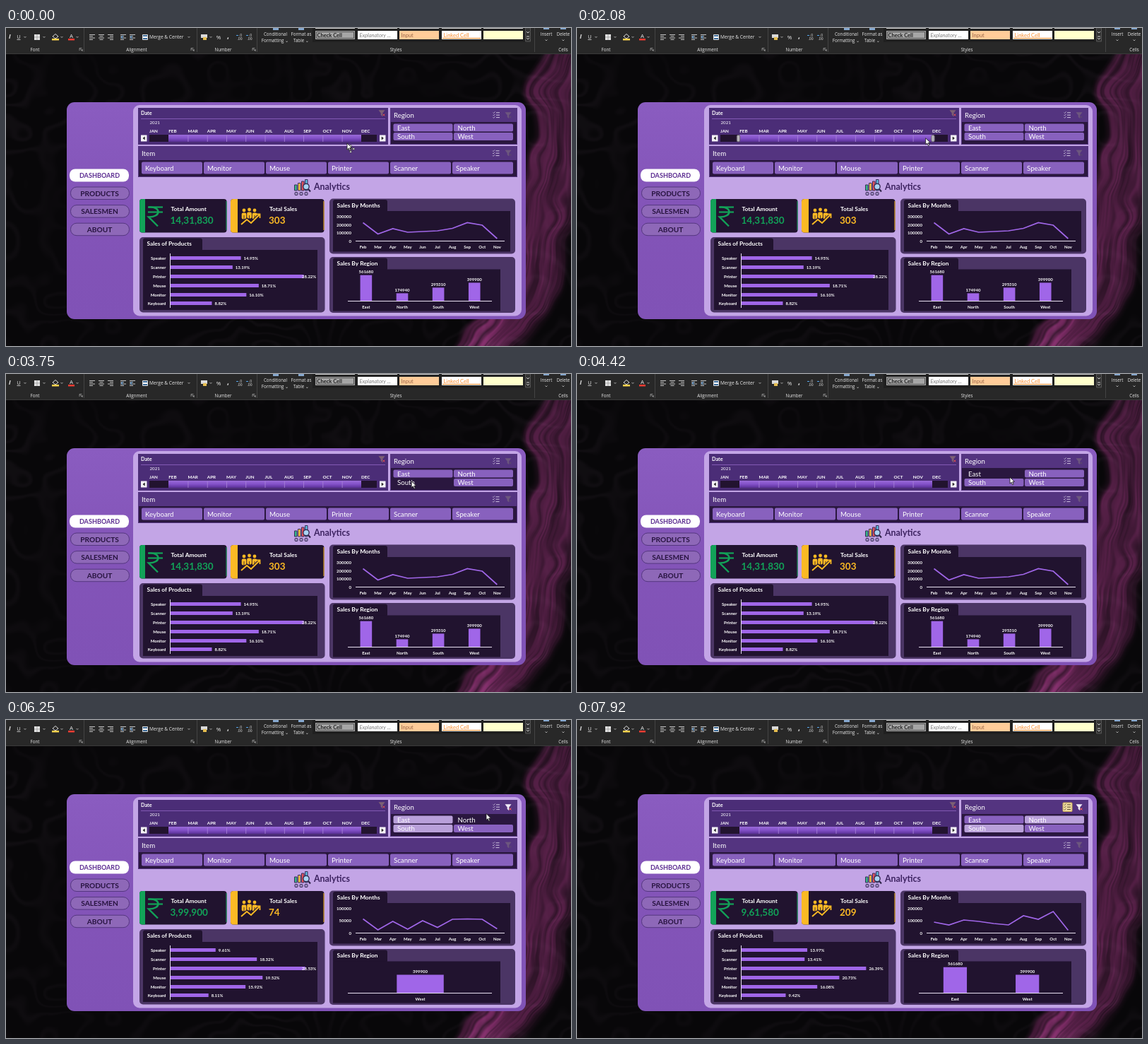
Animation, 800 px wide and 450 px high, one loop 8 s. Source, as an HTML page with a canvas:

```html
<!DOCTYPE html>
<html lang="en">
<head>
<meta charset="utf-8">
<title>Sales dashboard</title>
<style>
html, body { margin: 0; height: 100%; overflow: hidden; background: #08070a; }
canvas { display: block; width: 800px; height: 450px; }
</style>
</head>
<body>
<canvas id="stage" width="800" height="450"></canvas>
<script>
const LOOP = 8000;
const ctx = document.getElementById('stage').getContext('2d');
const LATO = 'Lato, sans-serif', UI = '"Open Sans", sans-serif';
const DARK = '#21132f', BAR = '#a066e8', PANEL = '#4b3565', GREEN = '#12a258', GOLD = '#fbb924';

const DATA = {
  all: { total: '14,31,830', count: 303, share: [14.95, 13.19, 28.22, 18.71, 16.10, 8.82], ticks: [300000, 200000, 100000, 0],
    line: [26, 10, 17.5, 12.5, 13.5, 14.5, 18, 26, 22.5, 3.5], regions: ['East', 'North', 'South', 'West'] },
  east: { total: '5,61,680', count: 135, share: [16.52, 10.54, 25.13, 21.44, 16.17, 10.19], ticks: [150000, 100000, 50000, 0],
    line: [7.5, 12.5, 13, 18, 6.5, 9.5, 19.5, 11.5, 28, 2], regions: ['East'] },
  west: { total: '3,99,900', count: 74, share: [9.61, 18.32, 28.53, 19.52, 15.92, 8.11], ticks: [100000, 50000, 0],
    line: [20, 4.5, 16.5, 5.5, 17.5, 8, 19.5, 20, 19.5, 6], regions: ['West'] },
  both: { total: '9,61,580', count: 209, share: [13.97, 13.41, 26.39, 20.73, 16.08, 9.42], ticks: [200000, 100000, 0],
    line: [15.5, 11.5, 18.5, 16.5, 13.5, 11.5, 24.5, 19.5, 30.5, 4], regions: ['East', 'West'] }
};
const SALES = { East: 561680, North: 174940, South: 295310, West: 399900 };
const MONTHS = 'Jan Feb Mar Apr May Jun Jul Aug Sep Oct Nov Dec'.split(' ');

// time, x, y of the pointer tip
const PATH = [[0, 483, 163], [300, 483, 163], [700, 489, 155], [1900, 489, 155], [2600, 517, 160],
  [3300, 517, 160], [4100, 613, 146], [4550, 613, 146], [4950, 657, 152.5], [5400, 657, 152.5],
  [6100, 680, 132.5], [6300, 680, 132.5], [6600, 692, 122], [6850, 692, 122], [7200, 600, 139], [8000, 600, 139]];

function rect(x, y, w, h, fill, r = 0, stroke) {
  ctx.beginPath();
  ctx.roundRect(x, y, w, h, r);
  if (fill) { ctx.fillStyle = fill; ctx.fill(); }
  if (stroke) { ctx.strokeStyle = stroke; ctx.lineWidth = 1; ctx.stroke(); }
}

// y is the middle of the capitals
function text(str, x, y, size, color = '#fff', { weight = 400, align = 'left', family = LATO } = {}) {
  ctx.font = `${weight} ${size}px ${family}`;
  ctx.textAlign = align;
  ctx.fillStyle = color;
  ctx.fillText(str, x, y + size * 0.36);
}

const label = (str, x, y, align = 'center') => text(str, x, y, 6, '#fff', { weight: 700, align });

function line(points, color, width = 1, close = false, fill) {
  ctx.beginPath();
  points.forEach(([x, y]) => ctx.lineTo(x, y));
  if (close) ctx.closePath();
  if (fill) { ctx.fillStyle = fill; ctx.fill(); }
  ctx.strokeStyle = color;
  ctx.lineWidth = width;
  ctx.stroke();
}

function circle(x, y, r, fill) {
  ctx.beginPath();
  ctx.arc(x, y, r, 0, 7);
  ctx.fillStyle = fill;
  ctx.fill();
}

function gradient(y0, y1, ...colors) {
  const g = ctx.createLinearGradient(0, y0, 0, y1);
  colors.forEach((c, i) => g.addColorStop(i / (colors.length - 1), c));
  return g;
}

const clamp = v => Math.max(0, Math.min(1, v));
const smooth = v => { v = clamp(v); return v * v * (3 - 2 * v); };

// Marbled wallpaper: a magenta stream down the right side, bending left at the bottom, over faint grey swirls
function makeWallpaper() {
  const hash = (x, y) => { const s = Math.sin(x * 127.1 + y * 311.7) * 43758.5453; return s - Math.floor(s); };
  const noise = (x, y) => {
    const i = Math.floor(x), j = Math.floor(y), u = smooth(x - i), v = smooth(y - j);
    const top = hash(i, j) * (1 - u) + hash(i + 1, j) * u;
    const low = hash(i, j + 1) * (1 - u) + hash(i + 1, j + 1) * u;
    return top * (1 - v) + low * v;
  };
  const canvas = new OffscreenCanvas(800, 450), c = canvas.getContext('2d');
  const image = c.createImageData(800, 450);
  for (let y = 0, p = 0; y < 450; y++) {
    const depth = y / 450;
    const middle = 776 - 95 * depth ** 4 + 45 * clamp(1 - y / 150) ** 2;
    for (let x = 0; x < 800; x++, p += 4) {
      const warp = noise(x / 75, y / 75) * 0.65 + noise(x / 30, y / 30) * 0.35;
      const across = x - middle + 50 * (warp - 0.5);
      const stream = smooth((across + 50) / 16) * (1 - smooth((across - 18) / 38));
      const streak = noise(across / 7, y / 90) * 0.6 + noise(across / 2.5, y / 45) * 0.4;
      const k = stream * (0.25 + 0.85 * streak) * (0.8 + 0.5 * depth ** 3);
      const swirl = Math.max(0, Math.sin(warp * 32)) ** 2 * 9 * noise(x / 120 + 9, y / 120);
      image.data.set([8 + swirl + k * 98, 7 + swirl * 0.8 + k * 31, 9 + swirl + k * 78, 255], p);
    }
  }
  c.putImageData(image, 0, 0);
  return canvas;
}

function ribbon() {
  const ui = (s, x, y, align = 'center', size = 6.2, weight = 400) => text(s, x, y, size, '#e8e8e8', { family: UI, align, weight });
  rect(0, 0, 800, 37, '#282828');
  rect(0, 36, 800, 1, '#3a3a3a');
  [110, 270, 355, 748].forEach(x => rect(x, 0, 1, 34, '#444'));
  [['Font', 41], ['Alignment', 185], ['Number', 307.5], ['Styles', 552], ['Cells', 789]].forEach(([s, x]) => ui(s, x, 31));
  [106, 264, 351].forEach(x => {
    line([[x - 2, 32], [x - 2, 28.5], [x + 1.5, 28.5]], '#aaa', 0.7);
    line([[x - 1, 29.5], [x + 2, 32.5], [x + 2, 30]], '#ccc', 0.8);
  });
  text('I', 4, 12.5, 8, '#eee', { weight: 'italic 700', family: UI });
  ui('U', 18, 12, 'center', 7.5);
  rect(15.5, 16, 5, 0.8, '#ddd');
  rect(40, 9, 8, 8, '#e2e2e2');
  line([[44, 9], [44, 17]], '#888', 0.6);
  line([[40, 13], [48, 13]], '#888', 0.6);
  line([[66, 12], [70, 8.5], [74, 12], [70, 15]], '#ddd', 1, true);
  rect(65, 15, 10, 2.5, '#ffd34d');
  ui('A', 92.5, 11, 'center', 8);
  rect(88, 15, 9, 2.5, '#f03c32');
  [27, 54, 79, 101, 259, 290].forEach(x => line([[x - 1.5, 12], [x, 13.5], [x + 1.5, 12]], '#ccc', 0.8));
  [118, 131, 144, 162, 175].forEach((x, n) => {
    for (let i = 0; i < 4; i++) rect(x + (n === 1 && i % 2 ? 1.5 : n === 2 && i % 2 ? 3 : 0), 9 + i * 2.3, i % 2 ? 5 : 8, 0.9, '#d5d5d5');
    if (n > 2) line([[x + 4, 11], [x + 1, 13], [x + 4, 15]], '#57a5ee', 0.9);
  });
  rect(193.5, 9.5, 7, 7, '#3f6d9a', 0, '#ddd');
  rect(194, 12, 6, 2, '#fff');
  ui('Merge & Center', 203, 13, 'left', 6.6);
  rect(276, 9, 9, 5, '#d9d9d9');
  rect(279, 13, 5, 4, '#e5bd50');
  ui('%', 301, 13, 'center', 8);
  ui(',', 314.5, 11, 'center', 10, 700);
  [331, 345].forEach(x => {
    ui('.0', x + 1, 10.5, 'center', 5);
    ui('.00', x, 15, 'center', 5);
    rect(x - 5, 10, 3, 1, '#57a5ee');
  });
  ui('Conditional', 381.5, 9);
  ui('Formatting ⌄', 381, 17.5);
  ui('Format as', 418, 9);
  ui('Table ⌄', 418, 17.5);
  rect(378, 0, 8, 3, '#86a8cf');
  rect(414, 0, 8, 3, '#86a8cf');
  rect(434, 0, 302, 20, '#202020');
  const styles = [['Check Cell', '#a5a5a5', '#222', 700], ['Explanatory ...', '#fff', '#7f7f7f', 'italic 400'],
    ['Input', '#ffcc99', '#9a6a4a', 400], ['Linked Cell', '#fff', '#fa8a28', 400], ['', '#ffffcc', '#000', 400]];
  styles.forEach(([name, fill, color, weight], i) => {
    const x = Math.round(438 + i * 59.6);
    rect(x, 0, 56, 1, '#d0d0d0');
    rect(x, 4, 56, 12, fill);
    if (!i) rect(x + 1.5, 5.5, 53, 9, null, 0, '#555');
    if (i === 3) rect(x + 1, 14, 54, 1, '#fa8a28');
    text(name, x + 2.5, 10, 7.5, color, { weight });
  });
  rect(735.5, 0, 7, 19, '#333', 0, '#555');
  line([[737, 5], [739, 7], [741, 5]], '#ddd', 0.9);
  line([[737, 12], [741, 12]], '#ddd', 0.9);
  line([[737, 14], [739, 16], [741, 14]], '#ddd', 0.9);
  [['Insert', 765], ['Delete', 789]].forEach(([s, x]) => {
    ui(s, x, 9);
    line([[x - 1.5, 16.5], [x, 18], [x + 1.5, 16.5]], '#ccc', 0.8);
    rect(x - 4, 0, 8, 2, '#86a8cf');
  });
}

function sidebar() {
  rect(86, 105, 650, 307, gradient(105, 412, '#8a5cc0', '#8354b8', '#8052b6'), 11);
  rect(180, 109, 550, 298.5, '#c3a5e6', 9);
  rect(90, 199.5, 84, 18, '#fff', 8);
  text('DASHBOARD', 132.5, 208.5, 9.1, '#5c2d91', { weight: 700, align: 'center' });
  ['PRODUCTS', 'SALESMEN', 'ABOUT'].forEach((s, i) => {
    const y = 225 + i * 25.6;
    rect(91.5, y, 83, 17.5, '#8e68b8', 8.5, '#553780');
    text(s, 132.5, y + 8.9, 10.2, '#281440', { weight: 700, align: 'center' });
  });
}

function funnel(x, y, color, cross) {
  line([[x - 4, y - 4], [x + 4, y - 4], [x + 1, y], [x + 1, y + 4], [x - 1, y + 2.5], [x - 1, y]], color, 0.6, true, color);
  line([[x + 1.5, y + 1], [x + 4.5, y + 4]], cross, 1);
  line([[x + 4.5, y + 1], [x + 1.5, y + 4]], cross, 1);
}

function multiSelect(x, y, on) {
  if (on) rect(x - 6.5, y - 6, 13, 12.5, '#efdca0', 1, '#c9a958');
  const color = on ? '#5b4a30' : '#cfc3df';
  for (let i = -1; i < 2; i++) {
    line([[x - 5, y + i * 3.4], [x - 4, y + 1 + i * 3.4], [x - 2, y - 1.2 + i * 3.4]], color, 0.8);
    rect(x - 0.5, y - 0.3 + i * 3.4, 5, 1, color);
  }
}

function slicerFrame(x, y, w, h, header) {
  rect(x, y, w, h, '#2a173f');
  rect(x, y, w, header, '#543480');
  rect(x + 0.5, y + 0.5, w - 1, h - 1, null, 0, '#543480');
}

function dateSlicer(handles) {
  rect(187, 113, 354, 52, '#4b2d77');
  text('Date', 191, 120.5, 7.3, '#fff', { weight: 700 });
  funnel(532, 120.5, '#7d6075', '#d04a55');
  rect(191, 128, 346, 1, '#8259b4');
  text('2021', 203.5, 133.5, 6.2);
  const step = 27.27;
  MONTHS.forEach((m, i) => text(m.toUpperCase(), 203 + i * step, 145.5, 6.3, '#fff', { weight: 700 }));
  rect(203, 151, 322, 10, '#22132f');
  rect(230, 151, 273, 10, gradient(151, 161, '#9a6bd8', '#8250c8', '#5a3196'));
  for (let i = 2; i < 11; i++) rect(203 + i * step, 152, 0.8, 9, '#a984d8');
  [[191, 1], [529, -1]].forEach(([x, d]) => {
    rect(x, 151.5, 8.5, 9, '#f4f2f6');
    line([[x + 4.2 + d * 1.2, 154], [x + 4.2 - d * 1.3, 156], [x + 4.2 + d * 1.2, 158]], '#222', 0.5, true, '#222');
  });
  if (handles) [228.5, 504].forEach(x => rect(x - 2.2, 151.5, 4.4, 9.5, '#b8b4bc', 2, '#6b6472'));
}

function slicers(data, filtered, hovered, multi) {
  slicerFrame(544, 113, 180, 52, 20);
  text('Region', 549, 123.5, 9.6);
  multiSelect(694.5, 123, multi);
  funnel(711, 123.5, filtered ? '#f0eaf6' : '#6d577f', filtered ? '#ef5a5a' : '#5a4470');
  Object.keys(SALES).forEach((name, i) => {
    const x = 548.5 + i % 2 * 85.5, y = 135.5 + (i >> 1) * 12.5;
    if (name !== hovered) rect(x, y, 84, 11, data.regions.includes(name) ? '#8861be' : '#b9a0da', 2);
    text(name, x + 5.5, y + 5.6, 9.7);
  });

  slicerFrame(187, 167, 537, 44, 20);
  text('Item', 192, 177.5, 9.7);
  multiSelect(694, 177, false);
  funnel(711, 177, '#6d577f', '#5a4470');
  ['Keyboard', 'Monitor', 'Mouse', 'Printer', 'Scanner', 'Speaker'].forEach((name, i) => {
    const x = 192 + i * 88;
    rect(x, 189.5, 86, 17, '#8861be', 2);
    text(name, x + 5, 198.3, 9.7);
  });
}

function heading() {
  ['#35b58a', '#f6c344', '#e9555c', '#5bb7d9'].forEach((c, i) => rect(408.5 + i * 5, 222 - i * 2.5, 3.5, 8 + i * 2.5, c, 0, '#3a2d58'));
  circle(425, 224.5, 4.8, '#2d2348');
  circle(425, 224.5, 3.5, '#a9d3f2');
  line([[428, 228], [431, 231.5]], '#2d2348', 2);
  for (let i = 0; i < 3; i++) rect(409 + i * 7, 232.5, 4, 4, '#a08cc4', 1, '#3a2d58');
  text('Analytics', 436, 224.7, 12.4, '#3c2260', { weight: 700 });
}

function card(x, w, strip, color, name, value, tx) {
  rect(x, 242, w, 47.5, DARK, 4);
  rect(x, 242, strip, 47.5, color, [4, 0, 0, 4]);
  rect(x + w - 1, 245, 1, 41, color);
  text(name, tx, 256, 8.4, '#fff', { weight: 700 });
  text(value, tx - 1, 272.5, 13.5, color, { weight: 700 });
}

function cards(data) {
  card(189, 123.5, 8, GREEN, 'Total Amount', data.total, 233.5);
  [253.5, 260.5].forEach(y => line([[201, y], [222, y]], GREEN, 2.2));
  ctx.beginPath();
  ctx.moveTo(202, 253.5);
  ctx.bezierCurveTo(220, 252, 220, 268, 202, 267.5);
  ctx.lineTo(215, 280.5);
  ctx.lineWidth = 2.4;
  ctx.stroke();

  card(318, 132.5, 10, GOLD, 'Total Sales', data.count, 373);
  [337, 344.5, 352].forEach((x, i) => {
    circle(x, 258 - i % 2, 2.4, GOLD);
    rect(x - 3.3, 261.5 - i % 2, 6.6, 9, GOLD, 2);
    rect(x - 0.4, 265, 0.8, 6, DARK);
  });
  line([[333, 278], [341, 271], [347, 276], [358, 265]], DARK, 4);
  line([[333, 278], [341, 271], [347, 276], [359, 264]], GOLD, 2);
  line([[353.5, 263.5], [359.5, 263.5], [359.5, 269]], GOLD, 1.8);
}

function chartBox(x, y, w, h, title, tabW, tabH, innerW, innerH) {
  rect(x, y, w, h, PANEL, 5);
  rect(x + 5, y + 1.5, tabW, tabH + 2, DARK, 3);
  rect(x + 5, y + 1.5 + tabH, innerW, innerH, DARK);
  text(title, x + 10.5, y + 9.5, 8.3, '#fff', { weight: 700 });
}

function productChart(data) {
  chartBox(189, 296, 262.5, 106.5, 'Sales of Products', 84, 16.5, 247, 85);
  rect(232, 319, 1, 77, '#e8e0f0');
  ['Speaker', 'Scanner', 'Printer', 'Mouse', 'Monitor', 'Keyboard'].forEach((name, i) => {
    const y = Math.round(323.3 + i * 12.8), share = data.share[i], end = 232.3 + share * 6.71;
    label(name, 226.5, y + 2.4, 'right');
    rect(233, y, end - 233, 5, BAR);
    label(share.toFixed(2) + '%', Math.min(end + 4, 419), y + 2.4, 'left');
  });
}

function monthChart(data) {
  chartBox(458, 241.5, 263, 78, 'Sales By Months', 77, 16, 251, 57.5);
  const gap = 34.5 / (data.ticks.length - 1);
  data.ticks.forEach((v, i) => label(v, 489, 267 + i * gap, 'right'));
  rect(495, 301, 211, 1, '#e8e0f0');
  const x = i => 505.5 + i * 21.1;
  data.line.forEach((_, i) => label(MONTHS[i + 1], x(i), 310.3));
  line(data.line.map((h, i) => [x(i), 301.5 - h]), BAR, 1.7);
}

function regionChart(data) {
  chartBox(458, 324, 263, 79, 'Sales By Region', 77, 16, 237, 59);
  const slot = 204.5 / data.regions.length, w = slot * 0.325;
  data.regions.forEach((name, i) => {
    const x = 484.3 + slot * (i + 0.5), h = SALES[name] / 561680 * 37.3;
    rect(x - w / 2, 387 - h, w, h, BAR);
    label(SALES[name], x, 382 - h);
    label(name, x, 395.3);
  });
  rect(484, 386, 204, 1, '#e8e0f0');
}

function pointer(kind, x, y) {
  ctx.save();
  ctx.translate(x, y);
  ctx.lineJoin = 'round';
  if (kind === 'resize') {
    line([[-6, 0], [-3, -2.5], [-3, -0.7], [3, -0.7], [3, -2.5], [6, 0], [3, 2.5], [3, 0.7], [-3, 0.7], [-3, 2.5]], '#222', 0.7, true, '#fff');
  } else {
    if (kind === 'move') for (let i = 0; i < 4; i++) {
      ctx.save();
      ctx.translate(5, 8);
      ctx.rotate(i * Math.PI / 2);
      line([[-0.6, 0], [-0.6, -3.5], [-2, -3.5], [0, -6], [2, -3.5], [0.6, -3.5], [0.6, 0]], '#222', 0.6, true, '#fff');
      ctx.restore();
    }
    line([[0, 0], [0, 9], [2.1, 7.2], [3.7, 10.7], [5.2, 10], [3.6, 6.7], [6.4, 6.4]], '#161616', 0.8, true, '#fff');
  }
  ctx.restore();
}

function pointerAt(t) {
  const i = PATH.findIndex(p => p[0] > t), [t0, x0, y0] = PATH[i - 1], [t1, x1, y1] = PATH[i];
  const k = smooth((t - t0) / (t1 - t0));
  return [x0 + (x1 - x0) * k, y0 + (y1 - y0) * k];
}

function regionUnder(x, y) {
  if (x < 548 || x > 718 || y < 131 || y > 160) return null;
  return Object.keys(SALES)[(x > 633 ? 1 : 0) + (y > 147 ? 2 : 0)];
}

const wallpaper = makeWallpaper();

function draw(t) {
  const [x, y] = pointerAt(t);
  const kind = t < 500 ? 'move' : t < 1950 ? 'resize' : 'arrow';
  const shown = t < 7700;
  const data = DATA[t < 4600 ? 'all' : t < 5250 ? 'east' : t < 7350 ? 'west' : 'both'];
  ctx.drawImage(wallpaper, 0, 0);
  ribbon();
  sidebar();
  dateSlicer(kind !== 'move' && x < 541);
  slicers(data, t >= 4600, shown && regionUnder(x, y), t > 6700);
  heading();
  cards(data);
  productChart(data);
  monthChart(data);
  regionChart(data);
  if (shown) pointer(kind, x, y);
}

const start = performance.now();
function frame() {
  draw((performance.now() - start) % LOOP);
  requestAnimationFrame(frame);
}
frame();
</script>
</body>
</html>
```
